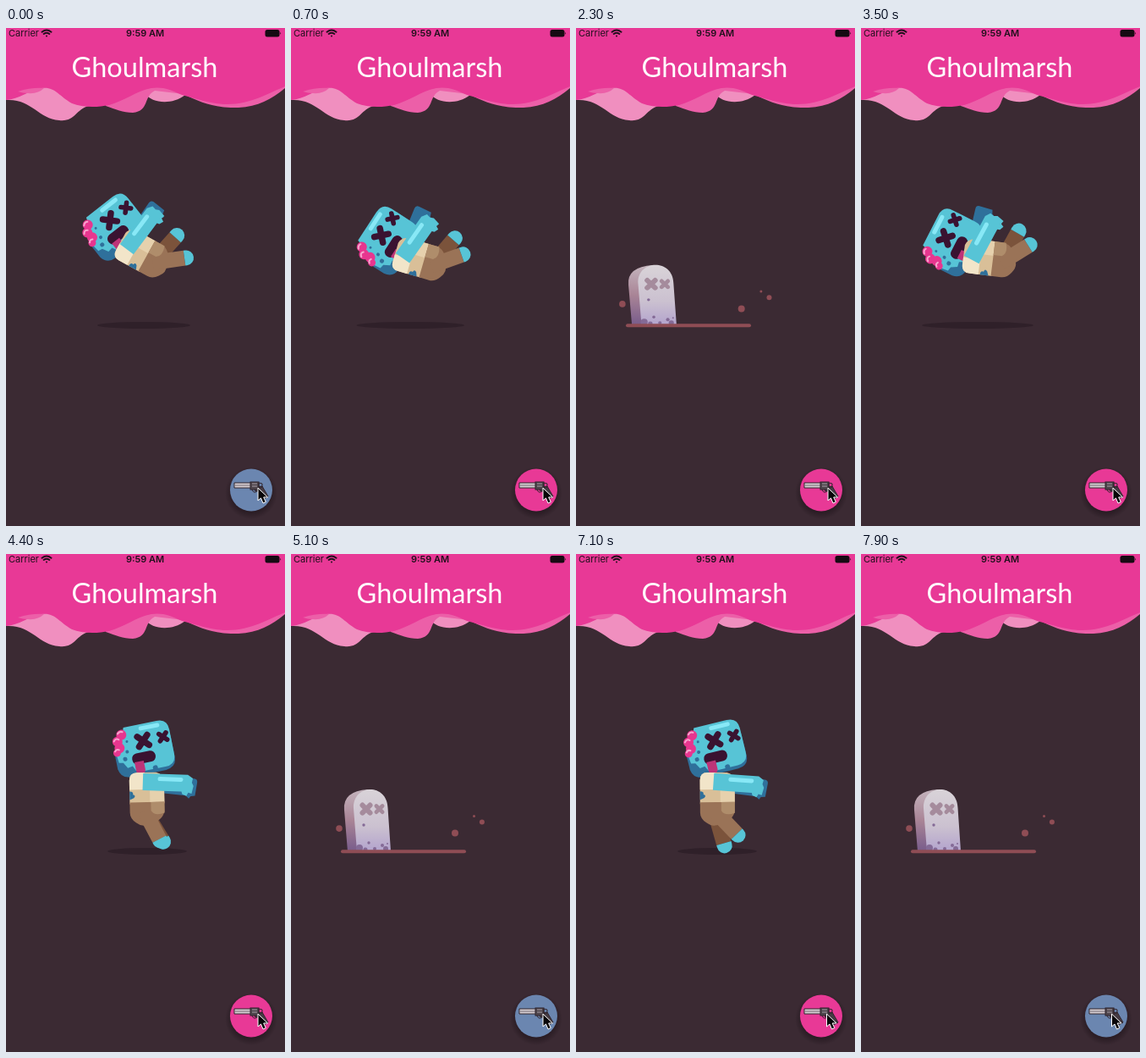
Recreate the animation shown at these times as an HTML page. Size 330 px wide and 588 px high, loop 8 s.

```html
<!DOCTYPE html>
<html lang="en">
<head>
<meta charset="utf-8">
<style>
html, body { margin: 0; width: 100%; height: 100%; overflow: hidden; background: #3b2a33; }
svg { display: block; width: 330px; height: 588px; }
text { font: 11px Inter, sans-serif; fill: #21101c; }
.clock { font-weight: 600; }
.title { font: 32.5px Lato, sans-serif; fill: #fff; }
.round { fill: none; stroke-linecap: round; }
</style>
</head>
<body>
<svg viewBox="0 0 330 588">
<defs>
  <linearGradient id="slab" x2="0" y2="1">
    <stop stop-color="#d9d3d8"/><stop offset=".6" stop-color="#cbc1d0"/><stop offset="1" stop-color="#b3a3cd"/>
  </linearGradient>
  <linearGradient id="edge" x2="0" y2="1">
    <stop stop-color="#c4b4bd"/><stop offset=".5" stop-color="#a98496"/><stop offset="1" stop-color="#785c8b"/>
  </linearGradient>
  <radialGradient id="glow">
    <stop offset=".75" stop-color="#21151c" stop-opacity=".6"/><stop offset="1" stop-color="#21151c" stop-opacity="0"/>
  </radialGradient>
  <path id="cross" d="M-6-6L6 6M6-6L-6 6" class="round"/>
</defs>

<path fill="#f08fbf" d="M0 60V85C30 83 38 107 63 109C82 111 82 96 98 92L165 78C172 88 195 92 212 79V60Z"/>
<path fill="#ec5fa8" d="M118 92C130 96 138 100 150 100C170 98 162 81 176 74L210 78C230 88 248 95 275 94C298 93 314 84 330 71V50H110Z"/>
<path fill="#e83996" d="M0 0H330V69C312 76 290 90 262 90C242 90 228 84 208 79C194 72 184 69 172 71C155 74 138 87 122 91C108 94 90 94 78 89C62 80 58 69 42 71C26 74 16 84 0 85Z"/>
<path fill="#ec5fa8" d="M14 75Q30 70 45 71Q38 78 26 77Q20 77 14 75Z"/>
<text x="3" y="10.3">Carrier</text>
<g class="round" stroke="#21101c" stroke-width="2">
  <path d="M42.5 4.7Q48 .3 53.5 4.7M44.7 7Q48 4.5 51.3 7"/><path d="M48 9.5V9.6"/>
</g>
<text x="164.5" y="10.3" text-anchor="middle" class="clock">9:59 AM</text>
<rect x="306.500" y="2" width="17" height="8.500" rx="2.500" fill="#160a12"/>
<path d="M324.300 4.700q1.800 1.500 0 3z" fill="#160a12"/>
<text x="164" y="58" text-anchor="middle" class="title">Ghoulmarsh</text>

<g id="zombie">
  <ellipse id="shadow" cy="351" ry="4" fill="#2f2029"/>
  <g class="body">
    <g id="farArm"><path d="M0-10H57q4 0 4 4l-1 16-5 1-2 3-4-3H0Z" fill="#2f709b"/></g>
  </g>
  <g id="head">
    <path fill="#2f709b" d="M-30 6L-36 12V27Q-34 39-22 39H20Q33 38 33 26V0H-20Z"/>
    <path fill="#57c4d6" d="M-20-20H20Q33-20 33-7V22Q33 35 20 35H-8l-3-4-4 2-3-6-6 1-4-7-5-1-1-8 4-6-2-10 8-4Z"/>
    <path d="M0-15H20" stroke="#88e8f6" stroke-width="5" class="round"/>
    <g fill="#e7368f"><circle cx="-24" cy="-12" r="6"/><circle cx="-30" cy="-5" r="6"/><circle cx="-29" cy="3" r="6"/><circle cx="-33" cy="8" r="4.500"/></g>
    <path d="M-28-14q3-3 6-1M-34-6q3-4 6-1M-35 6q2-3 5-1" stroke="#f7a5cd" stroke-width="2" class="round"/>
    <g fill="#2f709b"><circle cx="-21" cy="9" r="2"/><circle cx="-25" cy="17" r="2.500"/><circle cx="-19" cy="-3" r="1.500"/><circle cx="8" cy="34" r="3"/></g>
    <use href="#cross" stroke="#3a1331" stroke-width="7.500"/>
    <use href="#cross" stroke="#3a1331" stroke-width="8" transform="translate(24) scale(.7)"/>
    <rect x="-17" y="13" width="28" height="13" rx="6" fill="#3a1331"/>
    <path d="M-15 23h11V33a5.500 5.500 0 0 1-11 0Z" fill="#bd3478"/>
  </g>
  <g class="body">
    <g id="farLeg"><path d="M0-9H40V9H0Z" fill="#7b533b"/><path d="M40-9h3a9 9 0 0 1 0 18h-3z" fill="#57c4d6"/></g>
    <path d="M-20 1V-27Q-20-36-11-36H12Q21-34 21-22V1Z" fill="#d9bf98"/>
    <path d="M-20-16V-27Q-20-36-11-36H-2V-16Z" fill="#f2e5c9"/>
    <path d="M4-16H21V0H4Z" fill="#e6d1ad"/>
    <path d="M-20-14q5 0 4 4 4 1 1 4l-5 2z" fill="#2f709b"/>
    <path d="M-20-1H21V10Q18 22 4 24Q-4 30-13 23Q-20 18-20 11Z" fill="#9a7357"/>
    <g id="nearLeg"><path d="M0-9H38V9H0Z" fill="#9a7357"/><path d="M38-9h2a9 9 0 0 1 0 18h-2z" fill="#57c4d6"/></g>
    <path d="M5-1H21V12Q9 16 5 9Z" fill="#af8d6b"/>
    <g id="nearArm">
      <path d="M-3-10H50l6 4-1 5 2 4-2 9-4-1-2 4-5-2-1-3H-3Z" fill="#57c4d6"/>
      <path d="M17-4H42" stroke="#88e8f6" stroke-width="5" class="round"/>
    </g>
  </g>
</g>

<g id="tomb">
  <g id="stone">
    <path fill="url(#edge)" d="M67 351L63 302Q61 280 91 278L100 351Z"/>
    <path fill="url(#slab)" d="M78 351L74 300C73 271 114 270 114.500 300L118 351Z"/>
    <g stroke="#a58b9c">
      <use href="#cross" stroke-width="8" transform="translate(89 301) scale(.75)"/>
      <use href="#cross" stroke-width="8" transform="translate(104.500 301) scale(.6)"/>
    </g>
    <g fill="#846a96"><circle cx="86" cy="320" r="1.700"/><circle cx="92" cy="341" r="1.700"/><circle cx="108" cy="344" r="2"/><circle cx="81" cy="347" r="4"/><circle cx="88" cy="349" r="2.500"/><circle cx="99" cy="348" r="2"/><circle cx="112" cy="348" r="3"/><circle cx="114" cy="342" r="1"/></g>
  </g>
  <path id="ground" stroke="#8f4d55" stroke-width="4" class="round"/>
  <g id="dust" fill="#8f4d55"></g>
</g>

<circle cx="290" cy="549" r="31" fill="url(#glow)"/>
<circle id="button" cx="290" cy="545.500" r="25"/>
<g stroke="#30242c" stroke-width="1">
  <path d="M297 542l6-1 7 12-5 3-6-9-5-1z" fill="#453b43"/>
  <path d="M270 537H291V543H270Z" fill="#d4ccd1"/>
  <path d="M271 540H290" stroke="#756b73"/>
  <rect x="289" y="536" width="10" height="9" fill="#4d444b"/>
  <path d="M291 538H297M291 541H297" stroke="#a79da5"/>
  <path d="M299 537l4 1v4h-4zM291 545q2 5 6 2" fill="none"/>
</g>
<path id="cursor" d="M0 0V15L3.500 12 6 18 9.300 16.600 6.700 11H11.500Z" fill="#090609" stroke="#fff" stroke-width="1"/>
</svg>
<script>
const LOOP = 8000, CYCLE = 2800, BURST = 2050, GONE = 2600;
const $ = id => document.getElementById(id);
const bodies = document.querySelectorAll('.body');
const set = (el, name, value) => el.setAttribute(name, value);

// head x, y, turn; body x, y, turn; arms near, far; legs near, far; shadow x, radius
const tilt  = [123, 227, -38, 167, 270, -61, 8, 6, 53, 13, 163, 55];
const low   = [99, 268, -71, 157, 288, -84, 18, 6, 56, 20, 132, 68];
const float = [100, 248, -63, 157, 273, -83, 21, 6, 51, 22, 138, 66];
const step  = [161, 221, -9, 166, 294, -2, 2, 7, 80, 45, 167, 47];
const stand = [164, 220, -15, 167, 294, 0, 5, 8, 38, 82, 167, 47];
const flat  = [88, 305, -86, 152, 328, -90, 12, 6, 20, 8, 132, 68];
const poses = [[0, tilt], [50, tilt], [600, low], [700, float], [1150, step], [1450, stand],
  [1700, step], [1850, tilt], [1950, low], [BURST, flat], [GONE, flat], [CYCLE, tilt]];
const heights = [[BURST, [0]], [2200, [1.07]], [2300, [1]], [2350, [.973]], [2450, [1.01]], [2530, [1]], [GONE, [0]]];
const blue = [107, 134, 176], pink = [232, 57, 150];
const buttonHues = [[0, blue], [300, blue], [500, pink], [4700, pink], [4900, blue],
  [5400, blue], [5600, pink], [7600, pink], [7850, blue]];

// spread, rise, radius
const specks = [[-81, 35.4, 3.8], [65, 29.6, 4], [99, 43.4, 3], [89, 50.9, 1.5]].map(spec => {
  const el = document.createElementNS('http://www.w3.org/2000/svg', 'circle');
  $('dust').append(el);
  return [el, ...spec];
});

function sample(track, t) {
  const i = track.findIndex(key => key[0] > t);
  if (i < 0) return track[track.length - 1][1];
  if (i === 0) return track[0][1];
  const [t0, a] = track[i - 1], [t1, b] = track[i];
  return a.map((v, n) => v + (b[n] - v) * (t - t0) / (t1 - t0));
}

function drawZombie(s) {
  const [hx, hy, hr, bx, by, br, nearArm, farArm, nearLeg, farLeg, sx, sr] = sample(poses, s);
  set($('head'), 'transform', `translate(${hx} ${hy}) rotate(${hr})`);
  bodies.forEach(el => set(el, 'transform', `translate(${bx} ${by}) rotate(${br})`));
  set($('nearArm'), 'transform', `translate(-1 -25) rotate(${nearArm})`);
  set($('farArm'), 'transform', `translate(-1 -25) rotate(${farArm})`);
  set($('nearLeg'), 'transform', `translate(-3 9) rotate(${nearLeg})`);
  set($('farLeg'), 'transform', `translate(-3 9) rotate(${farLeg})`);
  set($('shadow'), 'cx', sx);
  set($('shadow'), 'rx', sr);
}

function drawTomb(s) {
  const u = s - BURST, spread = 1 - Math.exp(-u / 90);
  const [h] = sample(heights, s), w = Math.min(1.08, 1 + (1 - h) * 1.3);
  set($('stone'), 'transform', `translate(91 351) scale(${w} ${h}) translate(-91 -351)`);
  const half = 72 * Math.min(1, u / 120, (GONE - s) / 80);
  set($('ground'), 'd', `M${133 - half} 351.3H${133 + half}`);
  for (const [el, dx, rise, r] of specks) {
    set(el, 'cx', 133 + dx * spread);
    set(el, 'cy', Math.min(351, 351 - rise * spread + u * u * 1e-4));
    set(el, 'r', r * Math.min(1, Math.max(0, (GONE - s) / 120)));
  }
}

function draw(now) {
  const t = now % LOOP;
  const s = t < CYCLE ? t + 50 : t % CYCLE;
  const buried = s >= BURST && s < GONE;
  $('zombie').style.display = buried ? 'none' : '';
  $('tomb').style.display = buried ? '' : 'none';
  if (buried) drawTomb(s); else drawZombie(s);
  set($('button'), 'fill', `rgb(${sample(buttonHues, t).map(Math.round)})`);
  set($('cursor'), 'transform', `translate(${t < 5600 ? 298 : 296.5} 543)`);
  requestAnimationFrame(() => draw(performance.now()));
}
draw(0);
</script>
</body>
</html>
```
